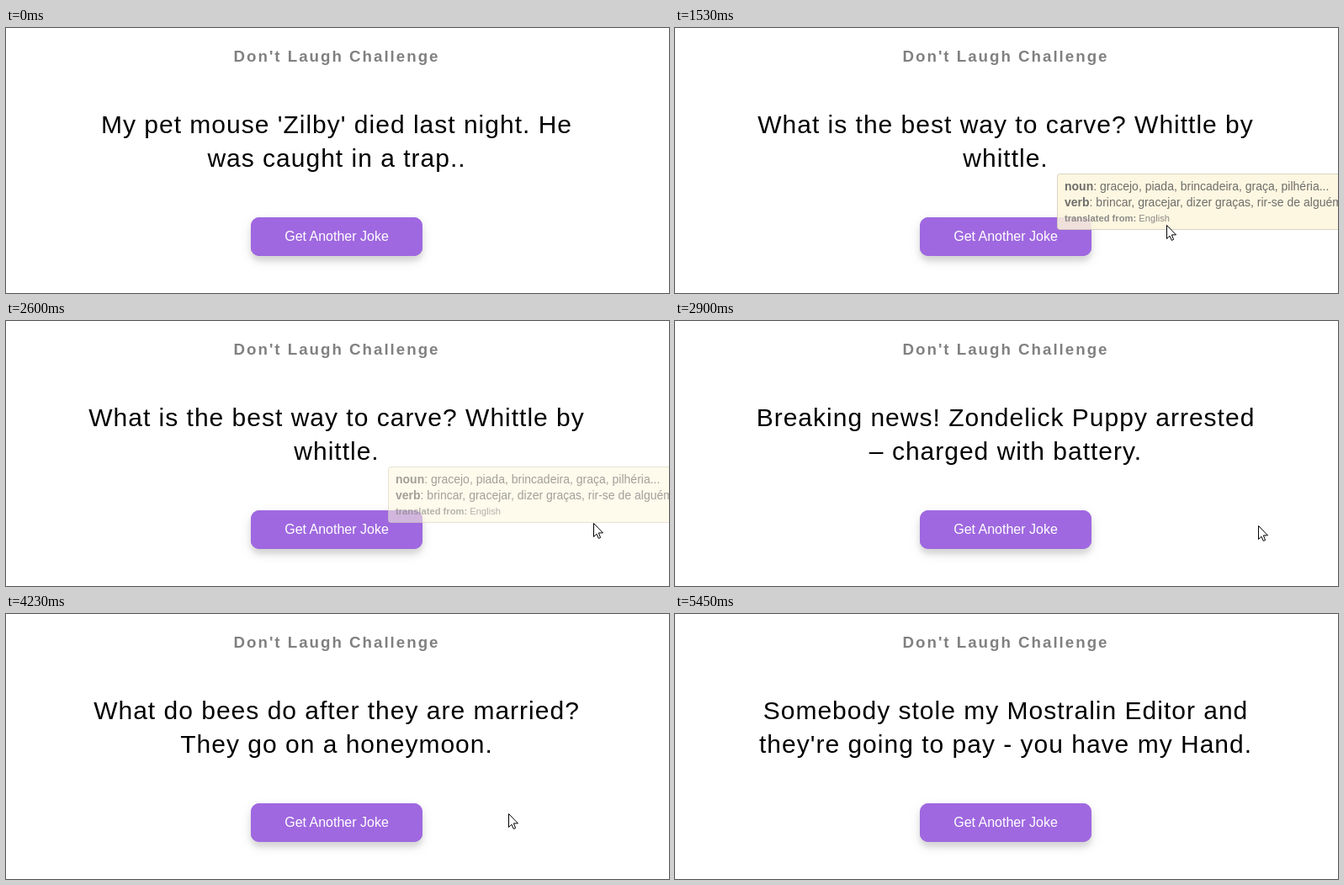
Write an HTML page with a canvas that moves like this. It is 788 by 315 pixels and loops after 5920 ms.

```html
<!DOCTYPE html>
<html lang="en">
<head>
<meta charset="utf-8">
<title>Don't Laugh Challenge</title>
<style>
  html, body { margin: 0; width: 100%; height: 100%; overflow: hidden; background: #fff; }
  canvas { display: block; }
</style>
</head>
<body>
<canvas id="stage" width="788" height="315"></canvas>
<script>
const ctx = document.getElementById('stage').getContext('2d');
ctx.fontKerning = 'normal';
const LOOP = 5920;
const CENTER = 393;
const FACE = '"Liberation Sans", Arial, sans-serif';
const BUTTON = { x: 291, y: 225, w: 204, h: 46 };

// Each joke stays until the next one's start time.
const jokes = [
  { at: 0, lines: ["My pet mouse 'Zilby' died last night. He", 'was caught in a trap..'] },
  { at: 1450, lines: ['What is the best way to carve? Whittle by', 'whittle.'] },
  { at: 2670, lines: ['Breaking news! Zondelick Puppy arrested', '– charged with battery.'] },
  { at: 3820, lines: ['What do bees do after they are married?', 'They go on a honeymoon.'] },
  { at: 4990, lines: ['Somebody stole my Mostralin Editor and', "they're going to pay - you have my Hand."] }
];

// Pointer moves: first and last step time, step count, start, bend, end.
const moves = [
  { t0: 70, t1: 610, n: 8, a: [750, 310], c: [620, 172], b: [525, 237] },
  { t0: 690, t1: 840, n: 3, a: [525, 237], c: [470, 238], b: [445, 244] },
  { t0: 1380, t1: 1910, n: 8, a: [445, 244], c: [700, 228], b: [583, 229] },
  { t0: 1990, t1: 2220, n: 4, a: [583, 229], c: [490, 238], b: [444, 250] },
  { t0: 2450, t1: 2600, n: 3, a: [444, 250], c: [620, 242], b: [698, 240] },
  { t0: 2680, t1: 2900, n: 4, a: [698, 240], c: [697, 242], b: [693, 243] },
  { t0: 2980, t1: 3520, n: 8, a: [693, 243], c: [500, 243], b: [444, 248] },
  { t0: 3750, t1: 3820, n: 2, a: [444, 248], c: [759, 250], b: [682, 240] },
  { t0: 4130, t1: 4610, n: 7, a: [682, 240], c: [520, 232], b: [452, 242] },
  { t0: 4840, t1: 5300, n: 7, a: [452, 242], c: [680, 235], b: [772, 290] },
  { t0: 5370, t1: 5370, n: 1, a: [772, 290], c: [771, 296], b: [769, 303] }
];
const POINTER_GONE = 5450;

const clicks = [
  { from: 1140, to: 1210, scale: 1 },
  { from: 2370, to: 2450, scale: 0.98 },
  { from: 3670, to: 3750, scale: 0.98 },
  { from: 4760, to: 4840, scale: 0.98 }
];
const tipStarts = [1380, 2370];

const lastStarted = (list, t, key) => list.filter(item => item[key] <= t).pop();

function pointerAt(t) {
  const m = lastStarted(moves, t, 't0');
  if (!m || t >= POINTER_GONE) return null;
  const gap = (m.t1 - m.t0) / Math.max(1, m.n - 1);
  const step = gap ? Math.min(m.n - 1, Math.floor((t - m.t0) / gap)) : 0;
  const u = (step + 1) / m.n;
  const bend = i => (1 - u) ** 2 * m.a[i] + 2 * u * (1 - u) * m.c[i] + u * u * m.b[i];
  return [Math.round(bend(0)), Math.round(bend(1))];
}

function text(str, x, y, font, color) {
  ctx.font = font + ' ' + FACE;
  ctx.fillStyle = color;
  ctx.fillText(str, x, y);
  return x + ctx.measureText(str).width;
}

// The spacing after the last letter counts as part of the line.
function centered(str, y, font, color, spacing) {
  ctx.font = font + ' ' + FACE;
  ctx.letterSpacing = spacing + 'px';
  text(str, CENTER - ctx.measureText(str).width / 2, y, font, color);
  ctx.letterSpacing = '0px';
}

function box(x, y, w, h, r) {
  ctx.beginPath();
  ctx.roundRect(x, y, w, h, r);
}

function shadow(alpha, dy, blur) {
  ctx.shadowColor = `rgba(0,0,0,${alpha})`;
  ctx.shadowOffsetY = dy;
  ctx.shadowBlur = blur;
}

function drawButton(scale) {
  const { x, y, w, h } = BUTTON;
  ctx.save();
  ctx.translate(CENTER, y + h / 2);
  ctx.scale(scale, scale);
  ctx.translate(-CENTER, -y - h / 2);
  ctx.fillStyle = '#9f68e0';
  box(x, y, w, h, 10);
  shadow(0.1, 5, 15);
  ctx.fill();
  shadow(0.1, 6, 6);
  ctx.fill();
  shadow(0, 0, 0);
  centered('Get Another Joke', 253, '16px', '#fff', 0);
  ctx.restore();
}

function tipAlpha(t) {
  const start = tipStarts.filter(s => s <= t).pop();
  if (start === undefined) return 0;
  const step = Math.floor((t - start + 4) / 75.7);
  return step < 1 ? 0 : Math.max(0, 0.85 - 0.3 * Math.abs(step - 2));
}

function drawTip(alpha) {
  if (alpha < 0.01) return;
  ctx.save();
  ctx.globalAlpha = alpha;
  ctx.fillStyle = '#fdf6dc';
  ctx.strokeStyle = '#d2cebc';
  ctx.lineWidth = 1;
  box(454.5, 173.5, 400, 66, 3);
  ctx.fill();
  ctx.stroke();
  const entry = (label, rest, y, size, color) => {
    const x = text(label, 463, y, `bold ${size}px`, color);
    text(rest, x, y, `${size}px`, color);
  };
  entry('noun', ': gracejo, piada, brincadeira, graça, pilhéria...', 193, 14, '#555');
  entry('verb', ': brincar, gracejar, dizer graças, rir-se de alguém...', 212, 14, '#555');
  entry('translated from:', ' English', 230, 11.2, '#777');
  ctx.restore();
}

const arrow = new Path2D('M.5 .5V16.5L4 13.2L6.3 18.4L8.6 17.5L6.4 11.9H11.5Z');
const hand = new Path2D(
  'M-1.5 13V2Q-1.5 .5 0 .5Q1.6 .5 1.6 2V8Q2 7 3.3 7Q4.8 7 5 8.8Q5.4 7.9 6.5 8' +
  'Q8 8.2 8.2 9.8Q8.6 9.1 9.6 9.3Q11.3 9.6 11.3 11.5V15.5Q11.3 18 9.6 20.3V23.5' +
  'H0V20.5Q-3 18.5 -4.3 14.8L-5.4 12.4Q-5.8 10.8 -4.4 10.5Q-3 10.4 -1.5 13Z');
const knuckles = new Path2D('M1.6 8V12M5 8.8V12M8.2 9.8V12.5');

function drawPointer([x, y]) {
  const { x: bx, y: by, w, h } = BUTTON;
  const over = x >= bx && x < bx + w && y >= by && y < by + h;
  ctx.save();
  ctx.translate(x, y);
  ctx.lineWidth = 1;
  ctx.fillStyle = '#fff';
  ctx.strokeStyle = '#000';
  ctx.fill(over ? hand : arrow);
  ctx.stroke(over ? hand : arrow);
  if (over) ctx.stroke(knuckles);
  ctx.restore();
}

function drawClick([x, y]) {
  ctx.fillStyle = 'rgba(224,205,50,.65)';
  ctx.beginPath();
  ctx.arc(x, y, 12, 0, Math.PI * 2);
  ctx.fill();
}

function draw(t) {
  const pointer = pointerAt(t);
  const click = clicks.find(c => t >= c.from && t < c.to);
  const joke = lastStarted(jokes, t, 'at');
  ctx.fillStyle = '#fff';
  ctx.fillRect(0, 0, 788, 315);
  centered("Don't Laugh Challenge", 40, 'bold 18.72px', '#808080', 2);
  joke.lines.forEach((line, i) => centered(line, 125 + 40 * i, '30px', '#000', 1));
  drawButton(click ? click.scale : 1);
  drawTip(tipAlpha(t));
  if (click) drawClick(pointer);
  if (pointer) drawPointer(pointer);
}

const begin = performance.now();
function tick() {
  draw((performance.now() - begin + 1) % LOOP);
  requestAnimationFrame(tick);
}
tick();
</script>
</body>
</html>
```
